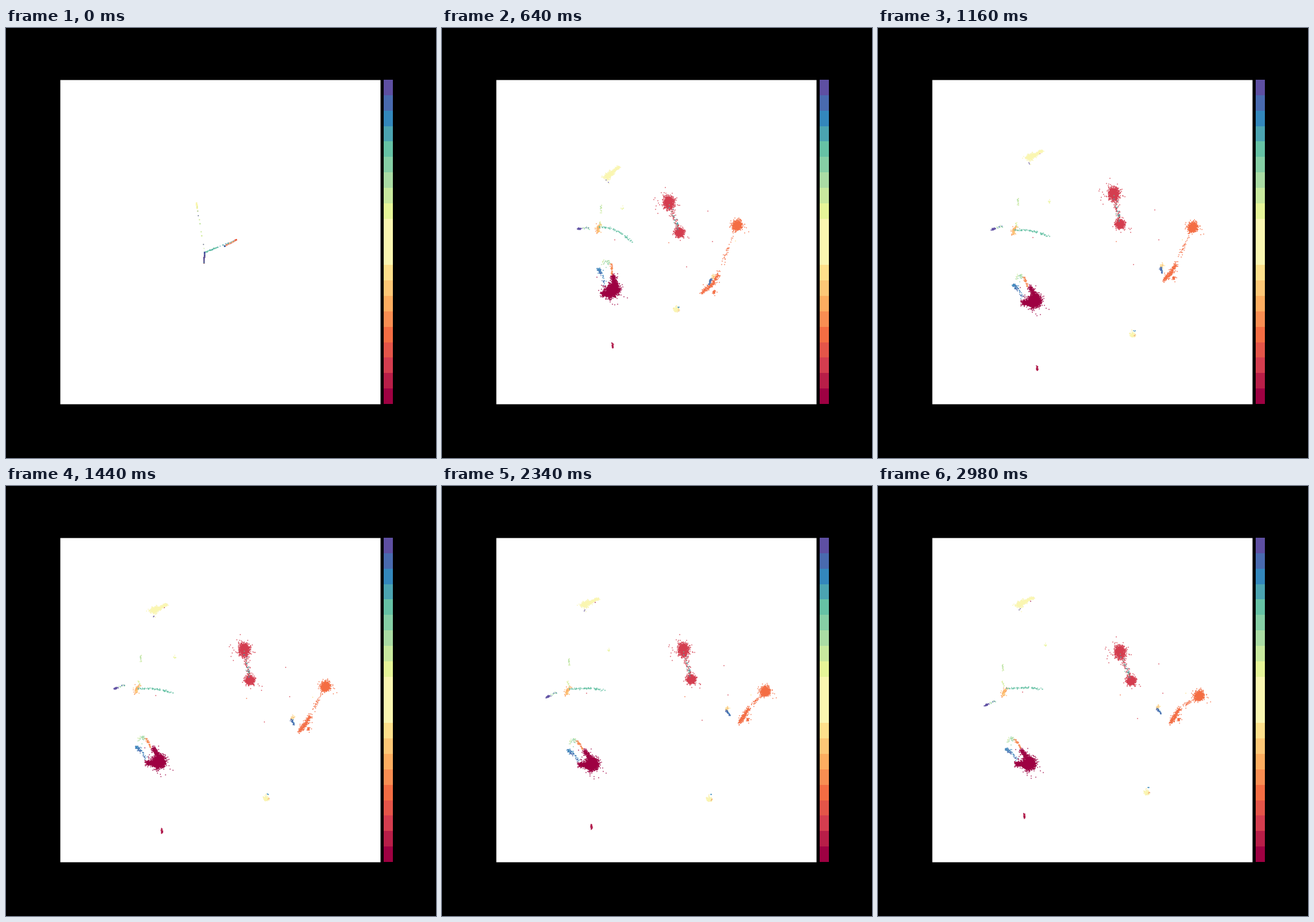
Write a matplotlib script that moves like this. It is 748 px wide and 748 px high and loops after 3.03 s.

```python
import numpy as np
import matplotlib.pyplot as plt
from matplotlib.animation import FuncAnimation
from matplotlib.patches import Rectangle

SIZE, LOOP, TICK = 748, 3030, 10
BURST, END = 320, 2980  # end of the first burst, last step

# corners of the opening "V"
FOOT, HUB, PEAK, MID, SIDE = np.array(
    [(344, 408), (345, 390), (331, 304), (380, 379), (400, 368)], float)

colors = plt.get_cmap("Spectral")(np.linspace(0, 1, 21))
colors[9:12] = (250 / 255, 246 / 255, 177 / 255, 1)

rng = np.random.default_rng(7)
parts = []


def node(burst, end, sway=(0, 0), kick=(0, 0)):
    """Where a spine node is after the burst and at the end, and how far it strays between."""
    return np.array([burst, end, sway, kick], float)


def strand(shade, n, spread, start, *spine, lean=1.0):
    """Scatter n dots around a spine; they open in a few spots between two corners."""
    u = rng.random(n) ** lean
    near = np.abs(u[:, None] * (len(spine) - 1) - np.arange(len(spine)))
    path = np.tensordot(np.clip(1 - near, 0, 1), np.array(spine), 1)
    a, b = start
    opening = a + (b - a) * np.round(u * 12)[:, None] / 12
    tail = np.where(rng.random((n, 1)) < 0.03, 2.3, 1)
    offset = rng.normal(size=(n, 2)) * spread * tail
    parts.append((rng.choice(np.atleast_1d(shade), n), opening, path, offset))


# crimson cloud with two wings
drift = (-6, 4)
low = node((319, 440), (260, 485), drift)
high = node((333, 426), (264, 481), drift)
strand(0, 1500, 4.8, (FOOT, FOOT), low, high)
strand(0, 380, 2.4, (FOOT, FOOT), low, node((313, 443), (239, 483), drift))
strand(0, 280, 2.4, (FOOT, HUB), high, node((338, 406), (248, 460), drift))

# crimson speck at the bottom
fall = (7, 37)
strand((0, 1), 30, 0.7, (FOOT, FOOT),
       node((319, 495), (253, 571), fall), node((320, 502), (254, 578), fall))

# pink pair with a bridge
upper = node((375, 323), (421, 288), (0, -9))
lower = node((404, 374), (440, 338), (-11, -6))
strand(2, 880, (4.3, 4.9), (SIDE, SIDE), upper)
strand(2, 580, 3.8, (MID, MID), lower)
strand(2, 90, 1.9, (MID, SIDE), upper, lower)
strand((16, 17), 26, 1.8, (HUB, SIDE), upper, lower)
strand(2, 20, 9, (SIDE, SIDE), upper)

# orange blob, its arm and foot
swing = dict(sway=(21, -6), kick=(-12, 40))
blob = node((470, 341), (559, 365), (10, -13))
arm = node((447, 398), (525, 386), **swing)
elbow = node((434, 419), (518, 398), **swing)
hand = node((408, 434), (510, 410), **swing)
strand(4, 680, 4.1, (SIDE, SIDE), blob)
strand(4, 45, 1.6, (SIDE, SIDE), blob, arm)
strand(4, 230, 1.9, (SIDE, SIDE), arm, elbow, hand)
strand(4, 30, 1.5, (SIDE, SIDE), node((435, 436), (524, 404), **swing))

# blue and gold beside the arm
swing = dict(sway=(18, 0), kick=(0, 33))
strand((18, 19), 36, 0.9, (MID, MID),
       node((438, 416), (486, 386), **swing), node((425, 427), (493, 395), **swing))
strand((6, 7, 8), 20, 2.2, (MID, SIDE), node((441, 412), (487, 383), **swing))

# yellow plume with three dark dots
plume = (PEAK, PEAK * 0.9 + HUB * 0.1)
tip = node((335, 275), (270, 193))
mid = node((323, 287), (256, 198))
tail = node((316, 301), (242, 206), (0, -4))
strand(10, 240, 1.3, plume, tip, mid, tail)
strand(10, 260, 2.6, plume, mid, tail, lean=0.6)
for burst, end in (((312, 301), (246, 212)), ((321, 305), (244, 214)), ((331, 276), (264, 199))):
    strand((0, 20), 1, 0, (PEAK, HUB), node(burst, end))

# teal thread and the orange knot at its head
drift = (-8, 2)
strand(16, 75, 0.6, (HUB, HUB * 0.6 + SIDE * 0.4),
       node((317, 339), (222, 352), drift), node((338, 344), (245, 351), drift),
       node((361, 364), (262, 350), drift), node((372, 384), (284, 353), drift))
drift = (-6, -3)
strand((5, 6, 7), 75, 1.6, (HUB, FOOT),
       node((316, 337), (223, 352), drift), node((315, 344), (217, 358), drift),
       node((315, 352), (215, 366), drift))

# purple dash and its green trail
drift = (-12, -25)
strand(20, 32, 0.7, (HUB, FOOT),
       node((284, 351), (184, 382), drift), node((291, 353), (191, 379), drift))
strand((14, 15, 19), 13, 0.7, (HUB, HUB),
       node((293, 353), (193, 377), drift), node((306, 355), (203, 374), drift))

# loop above the crimson cloud
drift = (-10, 7)
strand((18, 18, 19), 65, 1.7, (HUB, FOOT),
       node((317, 384), (222, 458), drift), node((319, 393), (230, 465), drift),
       node((322, 416), (240, 476), drift), lean=1.6)
strand((13, 14, 15), 26, 1.9, (HUB, HUB),
       node((329, 376), (226, 445), drift), node((341, 377), (233, 439), drift))
strand((4, 5, 5), 45, 0.9, (HUB, FOOT),
       node((344, 379), (235, 441), drift), node((343, 392), (241, 447), drift),
       node((339, 404), (248, 457), drift))

# pale cluster at lower right
fall = (0, 25)
strand((8, 9, 10, 10), 75, 2.3, (HUB, FOOT), node((364, 432), (468, 534), fall))
strand((2, 4, 5), 8, 1.4, (HUB, FOOT), node((368, 435), (471, 536), fall))
strand((2, 18), 3, 1, (HUB, HUB), node((369, 431), (472, 526), fall))

# green and yellow dots in the upper left
rise = (3, -18)
strand((13, 14), 14, 0.7, (PEAK, HUB),
       node((316, 324), (215, 310), rise), node((316, 340), (216, 321), rise))
strand((12, 13), 9, 0.7, (PEAK, HUB),
       node((317, 334), (215, 338)), node((317, 342), (217, 348)))
strand((10, 11, 12), 7, 1.2, (PEAK, HUB), node((333, 325), (289, 276), (-4, 14)))

# strays
strand((2, 4, 8), 7, (26, 18), (MID, SIDE), node((425, 365), (475, 352), (5, 5)))
strand(2, 1, 0, (HUB, HUB), node((340, 372), (250, 358), (-4, 3)))

shade, opening, path, offset = (np.concatenate(p) for p in zip(*parts))
burst, end, sway, kick = path.transpose(1, 0, 2)


def layout(step):
    """Dot positions at one 20 ms step: a quick burst, then a slow settling."""
    if step == 0:
        return opening
    t = 40 + 20 * (step - 1)
    jitter = np.random.default_rng(step).normal(size=offset.shape) * 0.5 * (1 - t / LOOP)
    if t < BURST:
        p = (t / BURST) ** 0.6
        return opening + (burst + offset - opening) * p + jitter
    late = t - BURST
    settle = np.exp(-late / 600)
    bump = np.sin(np.pi * (late / (END - BURST)) ** 0.75)
    q = late / 400
    return (end + (burst - end) * settle + sway * bump + kick * q * np.exp(1 - q)
            + offset + jitter)


fig = plt.figure(figsize=(SIZE / 100, SIZE / 100), dpi=100, facecolor="black")
ax = fig.add_axes([0, 0, 1, 1])
ax.set(xlim=(0, SIZE), ylim=(SIZE, 0))
ax.axis("off")

panel = Rectangle((94.5, 90.5), 557, 564, color="white", lw=0, snap=False)
ax.add_patch(panel)
band = 564 / 21
for i, c in enumerate(colors):
    ax.add_patch(Rectangle((657, 654 - (i + 1) * band), 16, band, color=c, lw=0))

groups = []
for i, c in enumerate(colors):
    line, = ax.plot([], [], "s", color=c, ms=1.5 * 72 / 100, mew=0)
    line.set_clip_path(panel)
    groups.append((shade == i, line))


def draw(frame):
    t = frame * TICK
    xy = layout(0 if t < 40 else min((t - 40) // 20 + 1, 148))
    for mask, line in groups:
        line.set_data(*xy[mask].T)
    return [line for _, line in groups]


anim = FuncAnimation(fig, draw, frames=LOOP // TICK, interval=TICK,
                     repeat=True, repeat_delay=0, blit=False)
plt.show()
```
